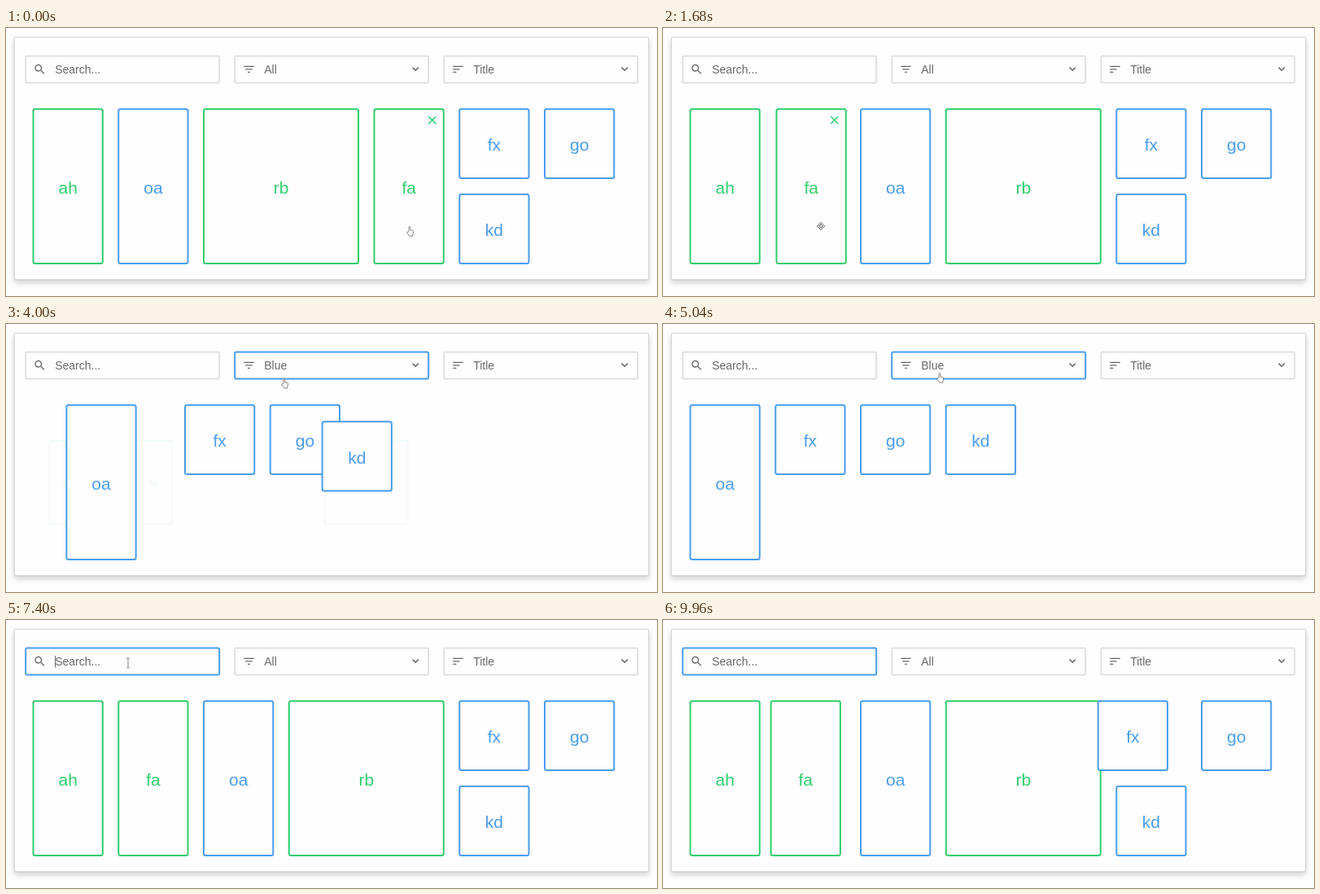
Write an HTML page that moves like this. It is 800 px wide and 330 px high and loops after 10000 ms.

```html
<!DOCTYPE html>
<html lang="en">
<head>
<meta charset="utf-8">
<title>Sortable grid</title>
<style>
html, body { margin: 0; width: 100%; height: 100%; overflow: hidden; background: #fefefe; }
.card {
  position: absolute; left: 10px; top: 11px; width: 778px; height: 297px;
  border: 1px solid #dcdbdd; background: #fefdff;
  box-shadow: 0 4px 7px rgba(0, 0, 0, .17), 0 0 2px rgba(0, 0, 0, .12);
}
svg { position: absolute; left: 0; top: 0; }
text { font-family: "Liberation Sans", Arial, sans-serif; }
.field rect { fill: #fefdff; stroke: #e1e0e5; stroke-width: 2; }
.field.focus rect { stroke: #4a9dee; }
.field text { font-size: 14px; fill: #6a6a6a; }
.icon { fill: #666; }
.line { fill: none; stroke: #666; stroke-width: 1.6; }
.item rect { fill: #fefdff; stroke: currentColor; stroke-width: 2; }
.item text { font-size: 21px; text-anchor: middle; fill: currentColor; }
.item path { fill: none; stroke: currentColor; stroke-width: 1.6; }
.blue { color: #4a9dee; }
.green { color: #2fcf6c; }
.cursor path { fill: #fff; stroke: #777; stroke-width: .9; stroke-linejoin: round; }
</style>
</head>
<body>
<div class="card"></div>
<svg width="800" height="330" viewBox="0 0 800 330"></svg>
<script>
const LOOP = 10000, MOVE = 400, FADE = 300;
const PRESS = 160, DROP = 1800;
const svg = document.querySelector('svg');

function add(parent, tag, attrs, label) {
  const node = document.createElementNS('http://www.w3.org/2000/svg', tag);
  for (const k in attrs) node.setAttribute(k, attrs[k]);
  if (label) node.textContent = label;
  return parent.appendChild(node);
}
const show = (node, on) => node.setAttribute('visibility', on ? 'visible' : 'hidden');
const within = (t, a, b) => t >= a && t < b;
const mix = (a, b, k) => a + (b - a) * k;

// cubic-bezier(.25, .1, .25, 1)
function ease(x) {
  if (x <= 0) return 0;
  if (x >= 1) return 1;
  let lo = 0, hi = 1, s = x;
  for (let i = 0; i < 24; i++) {
    s = (lo + hi) / 2;
    if (.75 * s * (1 - s) + s ** 3 < x) lo = s; else hi = s;
  }
  return .3 * s * (1 - s) ** 2 + 3 * s * s * (1 - s) + s ** 3;
}

// Toolbar
const ICONS = {
  search: 'M15.5 14h-.79l-.28-.27C15.41 12.59 16 11.11 16 9.5 16 5.91 13.09 3 9.5 3S3 5.91 3 9.5 5.91 16 9.5 16c1.61 0 3.09-.59 4.23-1.57l.27.28v.79l5 4.99L20.49 19l-4.99-5zm-6 0C7.01 14 5 11.99 5 9.5S7.01 5 9.5 5 14 7.01 14 9.5 11.99 14 9.5 14z',
  filter: 'M10 18h4v-2h-4v2zM3 6v2h18V6H3zm3 7h12v-2H6v2z',
  sort: 'M3 18h6v-2H3v2zM3 6v2h18V6H3zm0 7h12v-2H3v2z'
};
function field(x, icon, label, chevron) {
  const g = add(svg, 'g', { class: 'field', transform: `translate(${x})` });
  add(g, 'rect', { x: 0, y: 34.6, width: 238, height: 32.8, rx: 2 });
  add(g, 'path', { class: 'icon', d: ICONS[icon], transform: 'translate(9 42.6) scale(.69)' });
  const text = add(g, 'text', { x: 36, y: 55.6 }, label);
  if (chevron) add(g, 'path', { class: 'line', d: 'M218.3 48.5l3.7 3.7 3.7-3.7' });
  return { g, text };
}
const search = field(24.2, 'search', 'Search...');
const filter = field(281.2, 'filter', 'All', true);
field(538.2, 'sort', 'Title', true);
const caret = add(svg, 'path', { class: 'line', d: 'M0 44v14.5', style: 'stroke-width:1' });

// Grid items
const STEP = 104.75, LEFT = 32.5, TOP = 98.8;
const grid = add(svg, 'g', {});
function makeItem(id, color, cols, rows) {
  const w = 87.3 + (cols - 1) * STEP, h = 87.3 + (rows - 1) * 105;
  const g = add(grid, 'g', { class: 'item ' + color });
  add(g, 'rect', { x: 1, y: 1, width: w - 2, height: h - 2, rx: 2.5 });
  add(g, 'text', { x: w / 2, y: h / 2 + 9 }, id);
  const close = add(g, 'path', { d: `M${w - 19.5} 10.2l9 9m0-9l-9 9` });
  return { id, cols, w, h, g, close };
}
const items = [
  makeItem('ah', 'green', 1, 2), makeItem('oa', 'blue', 1, 2),
  makeItem('rb', 'green', 2, 2), makeItem('fa', 'green', 1, 2),
  makeItem('fx', 'blue', 1, 1), makeItem('go', 'blue', 1, 1),
  makeItem('kd', 'blue', 1, 1)
];
const byId = Object.fromEntries(items.map(it => [it.id, it]));

function pack(order) {
  const slots = {};
  let col = 0;
  for (const id of order.split(' ')) {
    const wrap = col > 6;
    slots[id] = { x: LEFT + STEP * (wrap ? col - 2 : col), y: TOP + (wrap ? 105 : 0) };
    col += byId[id].cols;
  }
  return slots;
}
const SORTED = 'ah fa oa rb fx go kd';
const layouts = [
  [-1000, 'ah oa rb fa fx go kd'],
  [440, 'ah oa fa rb fx go kd'],
  [880, SORTED],
  [DROP, SORTED],
  [3800, 'oa fx go kd'],
  [6160, SORTED],
  [8396, 'fa fx'],
  [9676, SORTED]
].map(([at, order]) => ({ at, slots: pack(order) }));

// Pointer path: time, x, y
const track = [
  [0, 496, 244], [PRESS, 507, 244], [600, 340, 260], [1040, 120, 265],
  [1200, 84, 258], [1600, 194, 244], [DROP, 194, 244], [2480, 346, 60],
  [2920, 346, 60], [3120, 342, 68], [3800, 342, 68], [4760, 341, 57],
  [4880, 341, 57], [5040, 340, 60], [5320, 340, 60], [5480, 339, 69],
  [6160, 339, 69], [6360, 338, 74], [7160, 150, 53], [LOOP, 150, 53]
];
function slope(i, k) {
  if (i < 1 || i > track.length - 2) return 0;
  const [a, b, c] = track.slice(i - 1, i + 2);
  const s = (b[k] - a[k]) / (b[0] - a[0]), r = (c[k] - b[k]) / (c[0] - b[0]);
  return s * r > 0 ? 2 * s * r / (s + r) : 0;
}
function pointer(t) {
  let i = 0;
  while (i < track.length - 2 && t >= track[i + 1][0]) i++;
  const a = track[i], b = track[i + 1], d = b[0] - a[0], u = (t - a[0]) / d;
  const at = k => mix(a[k], b[k], u * u * (3 - 2 * u)) +
    d * u * (1 - u) * (slope(i, k) * (1 - u) - slope(i + 1, k) * u);
  return { x: at(1), y: at(2) };
}
function dragged(t) {
  const p = pointer(t);
  return { x: LEFT + 4 * STEP + p.x - 507, y: TOP + p.y - 244 };
}

function pose(id, t) {
  let from, to, moved = -1000, shown = true, faded = -1000;
  const place = now => {
    if (id === 'fa' && now > PRESS && now <= DROP) return dragged(now);
    const k = ease((now - moved) / MOVE);
    return { x: mix(from.x, to.x, k), y: mix(from.y, to.y, k) };
  };
  for (const { at, slots } of layouts) {
    if (at > t) break;
    const slot = slots[id];
    if (!to) {
      from = to = slot;
    } else if (!slot) {
      if (shown) { shown = false; faded = at; }
    } else if (!shown) {
      from = to = slot;
      shown = true;
      faded = at;
    } else if (slot.x !== to.x || slot.y !== to.y || (id === 'fa' && at === DROP)) {
      from = place(at);
      to = slot;
      moved = at;
    }
  }
  const k = ease((t - faded) / FADE);
  const drag = id === 'fa' && within(t, PRESS, DROP);
  const z = drag ? 2 : t - moved < MOVE ? 1 : 0;
  return { ...place(t), vis: shown ? k : 1 - k, z };
}

// Cursors, drawn around their hot spot
const cursor = add(svg, 'g', { class: 'cursor' });
const shapes = {
  hand: 'M-1 6.4V1.3a.9.9 0 0 1 1.8 0V4.8l3 .7c.8.2 1 .7.9 1.4L4.2 9.6 3.6 12.2H0L-3.2 8.3c-.6-.9.3-1.7 1-1.1z',
  move: 'M0-5l2 2.2H.7V-.7H2.8V-2L5 0 2.8 2V.7H.7V2.8H2L0 5-2 2.8H-.7V.7H-2.8V2L-5 0-2.8-2V-.7H-.7V-2.8H-2z',
  beam: 'M-2-6h1.2l.8.8.8-.8H2M0-5.2V5.2M-2 6h1.2l.8-.8.8.8H2'
};
for (const k in shapes) shapes[k] = add(cursor, 'path', { d: shapes[k] });
shapes.beam.style.fill = 'none';

function setText(node, s) {
  if (node.textContent !== s) node.textContent = s;
}

function draw(t) {
  const p = pointer(t), drag = within(t, PRESS, DROP);

  filter.g.classList.toggle('focus', within(t, 2640, 7280));
  search.g.classList.toggle('focus', t >= 7280);
  setText(filter.text, within(t, 3800, 6160) ? 'Blue' : 'All');
  const typed = within(t, 8360, 9640);
  setText(search.text, typed ? 'f' : 'Search...');
  caret.setAttribute('transform', `translate(${typed ? 64.5 : 60.5})`);
  show(caret, within(t, 7400, 7960) || within(t, 8360, 8880) || within(t, 9400, 9640));

  const poses = items.map(it => ({ it, ...pose(it.id, t) }));
  poses.sort((a, b) => a.z - b.z);
  for (const { it, x, y, vis } of poses) {
    const s = .5 + .5 * vis, w = it.w / 2, h = it.h / 2;
    it.g.setAttribute('transform',
      `translate(${x + w} ${y + h}) scale(${s}) translate(${-w} ${-h})`);
    it.g.setAttribute('opacity', vis);
    const over = within(p.x, x, x + it.w) && within(p.y, y, y + it.h);
    it.close.setAttribute('opacity', (drag ? it.id === 'fa' : over) ? 1 : 0);
    grid.appendChild(it.g);
  }

  const kind = drag ? 'move' : p.x < 262 && p.y < 69 ? 'beam' : 'hand';
  for (const k in shapes) shapes[k].style.display = k === kind ? '' : 'none';
  cursor.setAttribute('transform', `translate(${p.x} ${p.y})`);
  show(cursor, t < 8360);
}

const start = performance.now();
function tick() {
  draw((performance.now() - start) % LOOP);
  requestAnimationFrame(tick);
}
tick();
</script>
</body>
</html>
```
